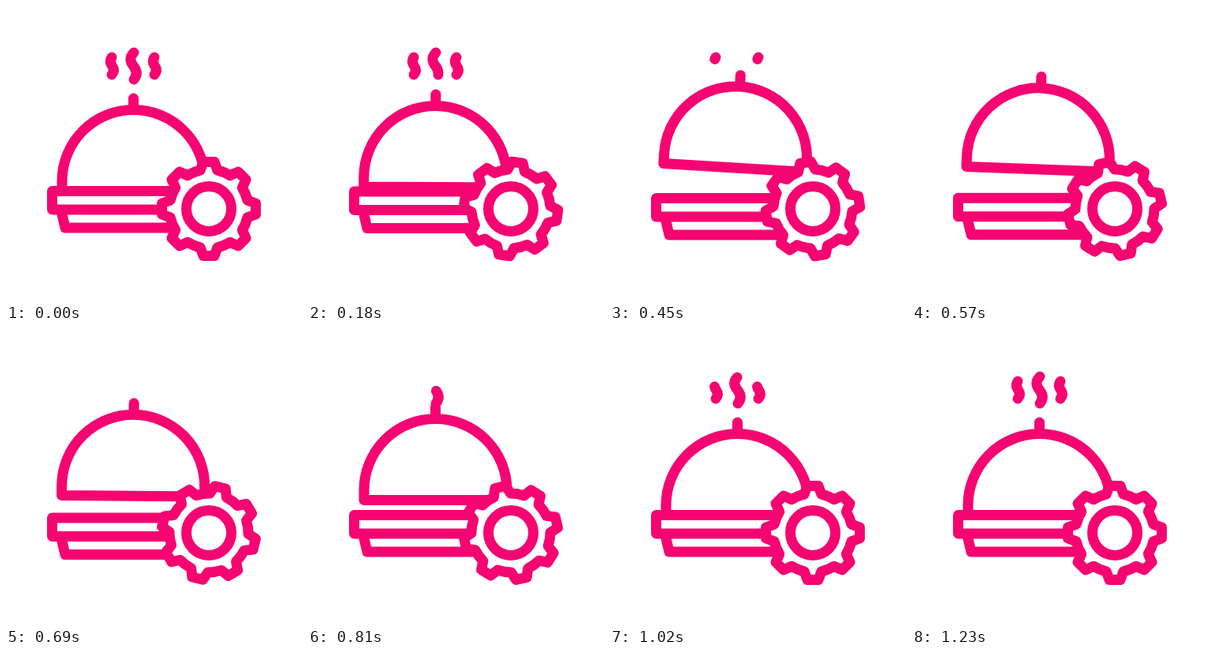
Animation of 375x375 px, one loop 1350 ms. Source, as an HTML page:

```html
<!DOCTYPE html>
<html lang="en">
<head>
<meta charset="utf-8">
<title>Dish and gear</title>
<style>
  html, body { margin: 0; width: 100%; height: 100%; overflow: hidden; background: #fff; }
  svg { display: block; width: 100%; height: 100%; }
</style>
</head>
<body>
<svg viewBox="0 0 375 375" fill="none" stroke="#f50571" stroke-width="13" stroke-linecap="round" stroke-linejoin="round">
  <path class="steam" pathLength="1" d="M134 65q-3.5 5.5 .5 11q4 5.5 -.5 11"/>
  <path class="steam" pathLength="1" d="M162 59q-8 8 -.5 17q7 9 .5 17"/>
  <path class="steam" pathLength="1" d="M188 65q-3.5 5.5 .5 11q4 5.5 -.5 11"/>
  <g id="base">
    <path d="M235 234.5H58.5V258H235M70 260L75 281H235"/>
  </g>
  <g id="dome">
    <path d="M71 234.5V222A90.5 90.5 0 0 1 252 222V234.5ZM161.5 117V131"/>
  </g>
  <path id="gear" fill="#fff"/>
  <circle cx="257" cy="257" r="28.5"/>
</svg>
<script>
const LOOP = 1350, STEP = 30, HUB = 257;
const $ = id => document.getElementById(id);
const steams = [...document.querySelectorAll('.steam')];
const clamp = x => Math.min(1, Math.max(0, x));

// Each track is a list of [ms, value] points.
const lift = [[60, 0], [180, -5], [330, -27.5], [440, -29.5], [570, -27.6], [810, -19], [1020, 0]];
const tilt = [[140, 0], [330, 3.3], [400, 3.7], [570, 2.2], [760, 0]];
const sink = [[150, 0], [330, 6.5], [480, 9.2], [570, 8.7], [790, 0]];
const turn = [[60, 0], [180, 8], [330, 39], [570, 122], [810, 167], [1020, 180]];

// Smooth curve through the points, without overshoot.
function track(points, t) {
  const last = points.length - 1;
  if (t <= points[0][0]) return points[0][1];
  if (t >= points[last][0]) return points[last][1];
  const rate = i => (points[i + 1][1] - points[i][1]) / (points[i + 1][0] - points[i][0]);
  const slope = i => {
    if (i === 0 || i === last) return 0;
    const a = rate(i - 1), b = rate(i);
    return a * b <= 0 ? 0 : 2 * a * b / (a + b);
  };
  let i = 0;
  while (t > points[i + 1][0]) i++;
  const [t0, v0] = points[i], [t1, v1] = points[i + 1];
  const d = t1 - t0, u = (t - t0) / d, w = 1 - u;
  return v0 * (1 + 2 * u) * w * w + slope(i) * d * u * w * w
       + v1 * u * u * (3 - 2 * u) - slope(i + 1) * d * u * u * w;
}

function gearPath() {
  const at = (deg, r) => {
    const a = deg * Math.PI / 180;
    return (HUB + r * Math.sin(a)).toFixed(2) + ' ' + (HUB - r * Math.cos(a)).toFixed(2);
  };
  let d = '';
  for (let k = 0; k < 360; k += 45) {
    d += (k ? 'A50 50 0 0 1 ' : 'M') + at(k - 12.6, 50)
       + 'L' + at(k - 6.7, 59.8) + 'L' + at(k + 6.7, 59.8) + 'L' + at(k + 12.6, 50);
  }
  return d + 'A50 50 0 0 1 ' + at(-12.6, 50) + 'Z';
}

// Steam leaves upwards, then grows back from its lower end.
function drawSteam(path, t, side) {
  let from = 0, to = 1;
  if (t < 600) {
    to = 1 - clamp((t - (side ? 180 : 60)) / 285) ** 2;
  } else {
    from = (1 - clamp((t - (side ? 850 : 710)) / 380)) ** 2;
  }
  const len = to - from;
  path.style.display = len > 0.001 ? '' : 'none';
  path.setAttribute('stroke-dasharray', len === 1 ? 'none' : len + ' 3');
  path.setAttribute('stroke-dashoffset', -from);
}

function draw(t) {
  steams.forEach((path, i) => drawSteam(path, t, i !== 1));
  $('base').setAttribute('transform', `translate(0 ${track(sink, t)})`);
  $('dome').setAttribute('transform',
    `translate(0 ${track(lift, t)}) rotate(${track(tilt, t)} 161.5 180)`);
  $('gear').setAttribute('transform', `rotate(${track(turn, t)} ${HUB} ${HUB})`);
}

$('gear').setAttribute('d', gearPath());
const start = performance.now();
function tick() {
  const t = (performance.now() - start) % LOOP;
  draw(Math.floor(t / STEP) * STEP);
  requestAnimationFrame(tick);
}
tick();
</script>
</body>
</html>
```
